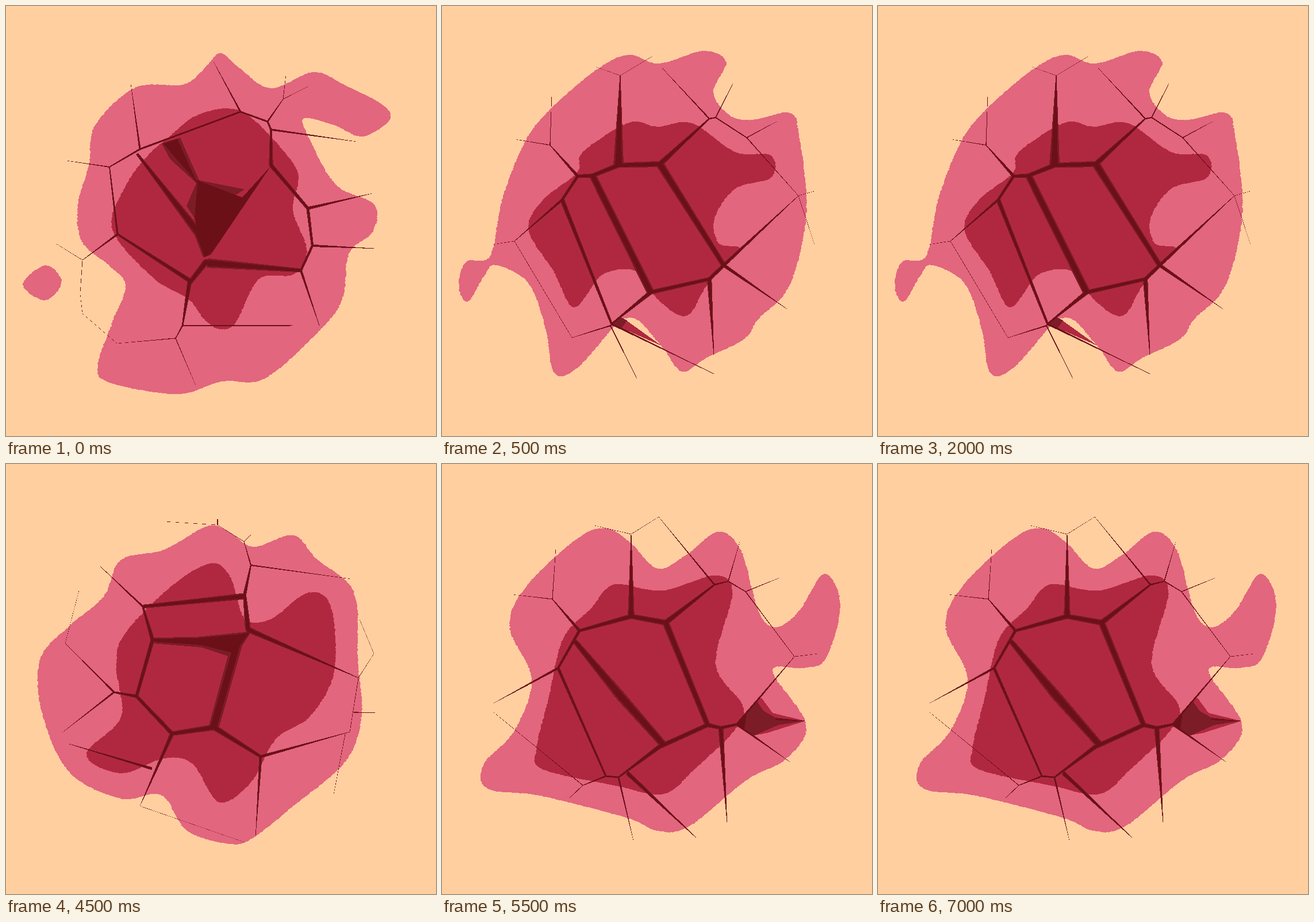
Recreate the animation shown at these times as an HTML page. Size 748 by 748 pixels, loop 8000 ms.

```html
<!DOCTYPE html>
<html lang="en">
<head>
<meta charset="utf-8">
<title>Cracked blobs</title>
<style>
  html, body { margin: 0; width: 100%; height: 100%; overflow: hidden; background: #ffcfa0; }
  svg { display: block; width: 100%; height: 100%; shape-rendering: crispEdges; }
  g { visibility: hidden; animation: 8s step-end infinite; }
  g:nth-child(1) { animation-name: first; }
  g:nth-child(2) { animation-name: second; }
  g:nth-child(3) { animation-name: third; }
  g:nth-child(4) { animation-name: fourth; }
  @keyframes first { 0% { visibility: visible; } 6.25%, 100% { visibility: hidden; } }
  @keyframes second { 0% { visibility: hidden; } 6.25% { visibility: visible; } 37.5%, 100% { visibility: hidden; } }
  @keyframes third { 0% { visibility: hidden; } 37.5% { visibility: visible; } 68.75%, 100% { visibility: hidden; } }
  @keyframes fourth { 0% { visibility: hidden; } 68.75%, 100% { visibility: visible; } }
</style>
</head>
<body>
<svg id="stage" viewBox="0 0 748 748"></svg>
<script>
const PINK = '#e2667e', RED = '#b0283f', EDGE = '#7b1c27', CORE = '#6c1018';
const stage = document.getElementById('stage');
let layer, cores, seed = 7;

const random = () => (seed = seed * 16807 % 2147483647) / 2147483647;

const points = text => {
  const nums = text.split(' ').map(Number), out = [];
  for (let i = 0; i < nums.length; i += 2) out.push(nums.slice(i, i + 2));
  return out;
};

function add(parent, tag, attrs = {}) {
  const el = document.createElementNS('http://www.w3.org/2000/svg', tag);
  for (const name in attrs) el.setAttribute(name, attrs[name]);
  return parent.appendChild(el);
}

function patch(fill, shape, parent = fill === CORE ? cores : layer) {
  add(parent, 'polygon', { points: String(shape), fill });
}

// Closed Catmull-Rom curve with a slightly ragged edge.
function blob(fill, text) {
  const pts = points(text), n = pts.length, out = [];
  pts.forEach((b, i) => {
    const a = pts[(i + n - 1) % n], c = pts[(i + 1) % n], d = pts[(i + 2) % n];
    const steps = Math.ceil(Math.hypot(c[0] - b[0], c[1] - b[1]) / 2);
    for (let s = 0; s < steps; s++) {
      const t = s / steps;
      const [x, y] = [0, 1].map(k => b[k] + t / 2 * (c[k] - a[k] +
        t * (2 * a[k] - 5 * b[k] + 4 * c[k] - d[k] + t * (3 * (b[k] - c[k]) + d[k] - a[k]))));
      out.push([x + (random() - .5) * 2, y + (random() - .5) * .8]);
    }
  });
  patch(fill, out);
}

// Cracks are widest near the middle and fade to hairlines outwards.
const width = ([x, y]) => .3 + 12 * Math.exp(-((Math.hypot(x - 370, y - 370) / 165) ** 3));

function taper(fill, parent, a, b, wa, wb) {
  const len = Math.hypot(b[0] - a[0], b[1] - a[1]);
  const nx = (a[1] - b[1]) / len / 2, ny = (b[0] - a[0]) / len / 2;
  const side = ([x, y], w) => [x + nx * w, y + ny * w];
  patch(fill, [side(a, wa), side(b, wb), side(b, -wb), side(a, -wa)], parent);
}

function crack(text, scale = 1) {
  const pts = points(text);
  for (const [fill, parent, part] of [[EDGE, layer, 1], [CORE, cores, .65]]) {
    const sizes = pts.map(p => {
      const w = width(p) * scale;
      return w > 3 ? w * part : w;
    });
    pts.forEach((p, i) => {
      const w = sizes[i];
      if (i) taper(fill, parent, pts[i - 1], p, sizes[i - 1], w);
      if (w > 1.5 && scale === 1) add(parent, 'circle', { cx: p[0], cy: p[1], r: w * .45, fill });
    });
  }
}

function scene(draw) {
  const g = add(stage, 'g');
  layer = add(g, 'svg');
  cores = add(g, 'svg');
  draw();
}

scene(() => {
  blob(PINK, '373 82 405 107 460 143 535 115 590 138 655 172 667 198 620 227 570 207 518 196 530 236 575 312 640 345 638 393 597 430 585 510 545 565 450 648 375 653 298 675 180 655 160 625 185 550 208 487 180 452 132 410 125 345 144 278 155 208 225 142 310 136 350 103');
  blob(PINK, '69 451 97 480 68 512 29 484');
  blob(RED, '385 178 425 193 480 249 509 295 499 355 523 425 500 467 440 475 400 550 372 562 345 545 317 510 255 472 185 388 210 310 245 262 290 222 330 191');
  patch(EDGE, '271 239 303 229 336 303 415 319 330 372 314 348 331 308 285 266');
  patch(CORE, '273 239 298 231 330 302 411 333 461 278 358 430 346 435 328 370 333 308');
  crack('361 97 408 184');
  crack('233 249 408 184 455 201 482 162 487 120');
  crack('482 162 527 139');
  crack('455 201 461 215 461 277 525 352 533 417 513 460 545 556 307 556 319 482 348 445');
  crack('610 236 461 215');
  crack('637 326 525 352');
  crack('645 422 533 417');
  crack('513 460 350 447', 1.5);
  crack('228 257 335 395 350 435', 1.3);
  crack('330 660 295 578 193 587 133 535 129 500 133 442 194 397 320 478');
  crack('307 556 295 578');
  crack('133 442 88 414');
  crack('194 397 180 280 233 249 217 135');
  crack('180 280 105 269');
});

scene(() => {
  blob(PINK, '325 85 378 100 455 78 494 98 472 150 500 190 540 198 605 186 621 225 634 360 605 485 550 545 525 580 460 612 418 636 385 596 345 550 322 543 300 557 235 630 195 638 180 560 150 482 95 451 75 467 45 514 29 487 42 445 84 434 105 335 145 235 190 178 270 110');
  blob(RED, '325 203 375 210 435 204 510 254 572 260 573 298 510 318 474 370 482 413 518 424 463 483 425 539 375 510 340 462 280 467 230 524 195 463 151 390 175 338 235 290 245 254');
  patch(RED, '296 553 318 545 382 591');
  patch(EDGE, '292 555 312 542 322 547 312 561');
  crack('310 121 307 277', 2);
  crack('268 106 310 121 365 88');
  crack('383 108 465 196 476 194 530 229 620 330 490 451 465 475 363 498 295 553');
  crack('209 337 126 409 226 577 293 556 340 650');
  crack('465 196 379 275 307 277 262 295 236 296 209 337');
  crack('379 275 490 451', 1.4);
  crack('262 295 363 498', 1.7);
  crack('209 337 295 553', 1.7);
  crack('506 135 476 194');
  crack('582 201 530 229');
  crack('648 322 620 330 648 415');
  crack('236 296 188 242 128 232');
  crack('191 150 188 242');
  crack('126 409 88 415');
  crack('465 475 473 608', 1.3);
  crack('490 451 600 527');
  crack('295 553 473 640', 1.5);
});

scene(() => {
  blob(PINK, '348 109 385 116 430 144 500 124 540 165 605 223 612 340 618 440 590 518 500 595 430 650 390 661 315 638 270 576 200 582 110 536 62 430 60 338 110 282 170 230 200 167 275 149');
  blob(RED, '355 173 390 197 415 268 460 270 525 224 565 248 571 360 530 438 470 478 425 555 370 588 325 522 275 512 200 538 140 505 200 440 192 355 205 298 285 215');
  patch(EDGE, '252 302 330 301 408 293 427 291 411 316 370 460 353 455 386 334 340 319 255 312');
  patch(CORE, '255 304 330 303 408 296 425 292 407 316 367 458 356 455 392 328 340 315 255 309');
  crack('275 100 368 106 414 135 426 176 415 228 421 288 613 372 598 466 443 509 362 458 289 469 227 404 255 306 238 248 164 178');
  crack('368 96 368 106', 3);
  crack('414 135 426 123');
  crack('600 200 426 176');
  crack('238 248 415 230', 1.8);
  crack('613 372 640 330 615 270');
  crack('605 432 645 433', 2);
  crack('434 650 443 509');
  crack('227 404 188 397 103 312 127 220');
  crack('188 397 98 467');
  crack('289 469 233 595 415 658');
  crack('254 530 110 487', 2);
  crack('590 470 570 575');
});

scene(() => {
  blob(PINK, '285 112 328 137 375 182 425 158 480 118 520 150 550 255 580 284 620 257 665 191 693 245 668 338 630 355 575 360 633 452 600 512 530 550 430 630 375 638 320 615 170 577 80 565 72 523 125 465 156 375 118 285 145 215 235 130');
  blob(RED, '310 209 385 220 475 194 505 225 476 348 523 420 510 462 440 530 385 574 300 559 175 531 164 495 185 410 210 305 260 250 285 218');
  patch(RED, '546 413 556 407 575 433 632 447 565 468 538 473');
  patch(EDGE, '513 453 547 412 560 430 580 441 632 447 585 454 542 473');
  patch(CORE, '513 453 530 433 526 461');
  crack('329 122 329 265', 1.3);
  crack('265 107 329 122 377 92 474 210 498 204 528 222 613 335 513 453 485 459 462 454 378 492 307 545 285 543 245 559 90 432');
  crack('518 135 498 204');
  crack('587 198 528 222');
  crack('655 330 613 335');
  crack('474 210 389 276 329 265 239 290 202 355 90 416');
  crack('389 276 462 454', 1.2);
  crack('122 227 192 235 239 290');
  crack('198 145 192 235');
  crack('202 355 285 543', 1.3);
  crack('245 559 222 581');
  crack('231 308 310 403 385 488', 1.5);
  crack('333 655 307 545');
  crack('322 537 442 650', 2);
  crack('485 459 496 625', 1.5);
  crack('513 453 605 518');
  crack('580 444 632 447', 2);
});
</script>
</body>
</html>
```
